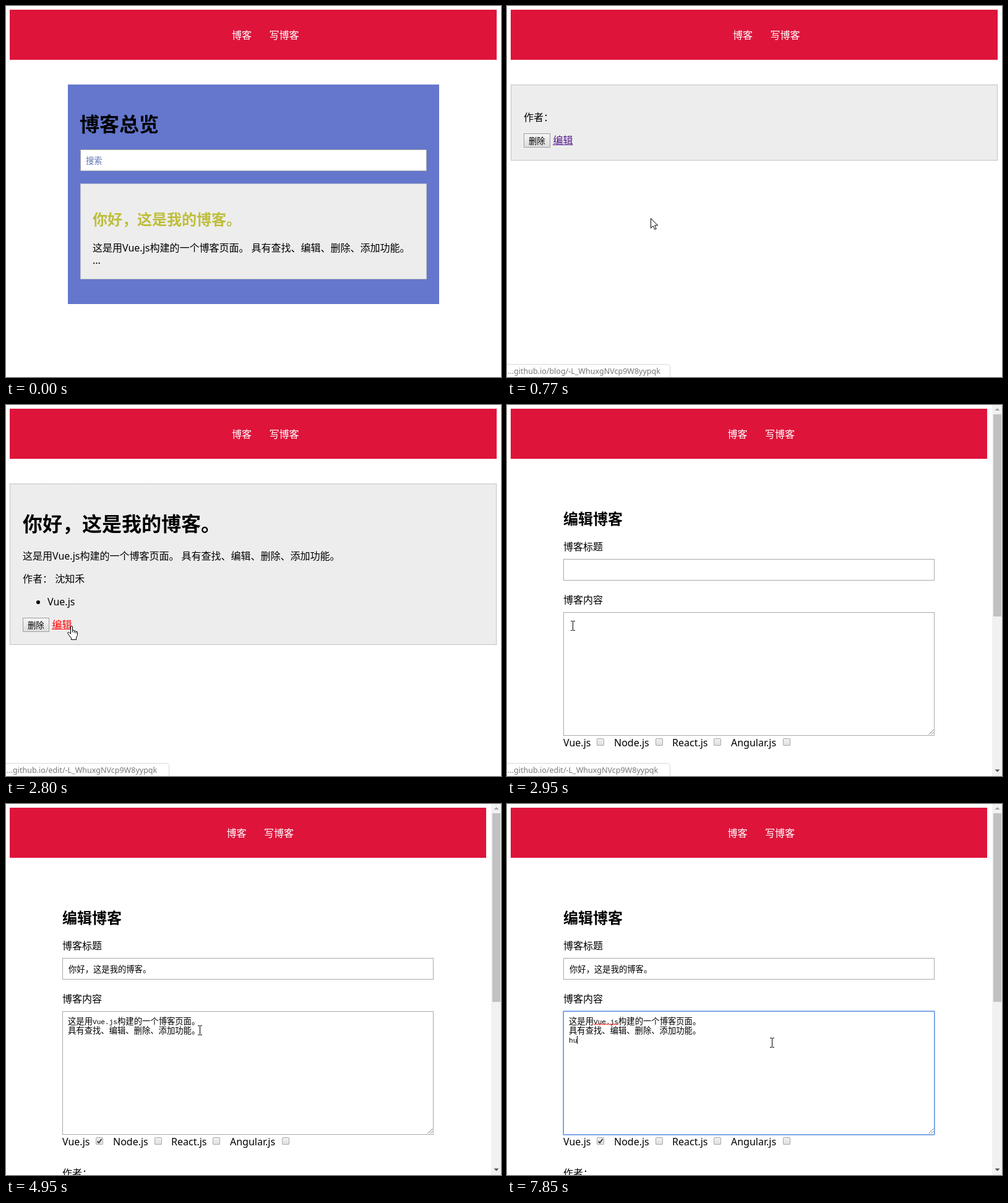
Animation of 800x600 px, one loop 8000 ms. Source, as an HTML page with a canvas:

```html
<!DOCTYPE html>
<html lang="zh-CN">
<head>
<meta charset="utf-8">
<title>博客</title>
<style>
html, body { margin: 0; width: 100%; height: 100%; overflow: hidden; background: #fff; }
canvas { display: block; }
</style>
</head>
<body>
<canvas id="stage" width="800" height="600"></canvas>
<script>
const ctx = document.getElementById('stage').getContext('2d', { alpha: false });
const LOOP = 8000;
const SANS = '"Noto Sans", "Noto Sans CJK SC", "Noto Sans CJK", sans-serif';
const MONO = '"Liberation Mono", monospace';
const SMALL = 13.333;

const TITLE = '你好，这是我的博客。';
const INTRO = '这是用Vue.js构建的一个博客页面。 具有查找、编辑、删除、添加功能。';
const AUTHOR = '沈知禾';
const POST_ID = '-L_WhuxgNVcp9W8yypqk';

const ARROW = new Path2D('M.5 .5V16.2L4.2 12.7 6.8 18.4 9.2 17.4 6.7 11.8H11.6Z');
const HAND = new Path2D('M5.5 13V2Q5.5 .5 7 .5T8.5 2V7.5Q10.8 6.3 11.3 8.4 13.2 7.3 14 9.3 16.5 8.7 16.5 11V15.5L14.5 19V22.5H6.5V20L3.2 15.8 .8 12.3Q.5 10.3 2.5 10.4Z');

// Drawing helpers
function rect(x, y, w, h, color) {
  ctx.fillStyle = color;
  ctx.fillRect(x, y, w, h);
}

function frame(x, y, w, h, color) {
  ctx.strokeStyle = color;
  ctx.lineWidth = 1;
  ctx.strokeRect(x + .5, y + .5, w - 1, h - 1);
}

function text(str, x, y, size = 16, color = '#000', weight = 400, family = SANS) {
  ctx.font = `${weight} ${size}px ${family}`;
  ctx.fillStyle = color;
  ctx.fillText(str, x, y);
}

function field(x, y, w, h) {
  rect(x, y, w, h, '#fff');
  frame(x, y, w, h, '#a9a9a9');
}

function card(x, y, w, h) {
  rect(x, y, w, h, '#ededed');
  ctx.setLineDash([1, 1]);
  frame(x, y, w, h, '#999');
  ctx.setLineDash([]);
}

function shade(y, h, from, to) {
  const g = ctx.createLinearGradient(0, y, 0, y + h);
  g.addColorStop(0, from);
  g.addColorStop(1, to);
  return g;
}

function triangle(x, y, dir, color) {
  ctx.fillStyle = color;
  ctx.beginPath();
  ctx.moveTo(x - 4, y);
  ctx.lineTo(x + 4, y);
  ctx.lineTo(x, y + 4 * dir);
  ctx.fill();
}

// Timing helpers: progress advances in n discrete steps from t0 to t1
function steps(t, t0, t1, n) {
  if (t < t0) return 0;
  return Math.min(n, Math.floor((t - t0) / (t1 - t0) * (n - 1) + .1) + 1) / n;
}

function along(pts, k) {
  const p = k * (pts.length - 1);
  const i = Math.min(Math.floor(p), pts.length - 2);
  const [a, b] = [pts[i], pts[i + 1]];
  return [0, 1].map(j => Math.round(a[j] + (b[j] - a[j]) * (p - i)));
}

// Page parts
function header(right, shift) {
  rect(6, 6, right - 6, 81, '#de143b');
  text('博客', 365 - shift, 53, 16, '#fff');
  text('写博客', 425.5 - shift, 53, 16, '#fff');
}

function listPage() {
  header(793, 0);
  rect(100, 127, 600, 355, '#6477cd');
  text('博客总览', 119, 203, 32, '#000', 700);
  field(120, 232, 560, 35);
  text('搜索', 129, 254.5, SMALL, '#5b70b3');
  card(120, 287, 560, 155);
  text(TITLE, 140, 354, 24, '#bebe3c', 700);
  text(INTRO, 140, 396.5);
  text('...', 140, 417);
}

function actions(y, active) {
  rect(27, y, 43, 23, shade(y, 23, '#f7f7f7', '#dcdcdc'));
  frame(27, y, 43, 23, '#a0a0a0');
  text('删除', 35, y + 16.5, SMALL);
  const color = active ? '#f00' : '#551a8b';
  text('编辑', 74.5, y + 17, 16, color);
  rect(74, y + 18, 32.5, 1, color);
}

function postPage(loaded, active) {
  header(793, 0);
  card(6, 127, 787, loaded ? 261 : 123);
  if (!loaded) {
    text('作者：', 27, 186);
    actions(206, false);
    return;
  }
  text(TITLE, 27, 204, 32, '#000', 700);
  text(INTRO, 27, 250);
  text('作者： ' + AUTHOR, 27, 287);
  ctx.beginPath();
  ctx.arc(52, 319, 3, 0, 7);
  ctx.fill();
  text('Vue.js', 67, 324);
  actions(344, active);
}

function checkbox(x, checked) {
  rect(x, 539, 12, 12, shade(539, 12, '#f2f2f2', '#dedede'));
  ctx.strokeStyle = '#aaa';
  ctx.beginPath();
  ctx.roundRect(x + .5, 539.5, 11, 11, 1.5);
  ctx.stroke();
  if (!checked) return;
  ctx.strokeStyle = '#404040';
  ctx.lineWidth = 2;
  ctx.beginPath();
  ctx.moveTo(x + 2.7, 545.5);
  ctx.lineTo(x + 5, 548);
  ctx.lineTo(x + 9.5, 541.8);
  ctx.stroke();
  ctx.lineWidth = 1;
}

function scrollbar(end) {
  rect(784, 0, 16, 600, '#f1f1f1');
  rect(786, 15, 13, end - 15, '#c1c1c1');
  triangle(792.5, 9, -1, '#a3a3a3');
  triangle(792.5, 589.5, 1, '#505050');
}

function focusRing() {
  ctx.strokeStyle = '#9cbcf0';
  ctx.beginPath();
  ctx.roundRect(90.5, 334.5, 601, 201, 1);
  ctx.stroke();
  frame(91, 335, 600, 200, '#5e92e4');
}

function squiggle() {
  ctx.strokeStyle = '#f00';
  ctx.beginPath();
  for (let x = 140; x <= 180; x += 2) ctx.lineTo(x, x % 4 ? 357 : 355.5);
  ctx.stroke();
}

function editor(t) {
  const half = SMALL / 2;
  text('这是用', 100, 356, SMALL, '#000', 300);
  text('Vue.js', 140, 355.5, 11.11, '#000', 400, MONO);
  text('构建的一个博客页面。', 180, 356, SMALL, '#000', 300);
  text('具有查找、编辑、删除、添加功能。', 100, 371, SMALL, '#000', 300);
  if (t < 5440) return;
  focusRing();
  squiggle();
  if (t < 5820) rect(313, 360, 1, 13, '#000');
  if (t >= 7150) {
    const n = t < 7300 ? 1 : t < 7450 || t >= 7850 ? 2 : 3;
    text('hui'.slice(0, n), 100, 386, 11.11, '#000', 400, MONO);
    rect(Math.round(100 + n * half), 375, 1, 13, '#000');
  }
}

function editPage(t) {
  const loaded = t >= 3180;
  header(776, 8.5);
  text('编辑博客', 91, 193, 24, '#000', 700);
  text('博客标题', 91, 235);
  field(91, 249, 600, 35);
  text('博客内容', 91, 321);
  field(91, 335, 600, 200);
  ctx.strokeStyle = '#777';
  ctx.beginPath();
  for (const d of [8, 4]) {
    ctx.moveTo(689.5 - d, 533);
    ctx.lineTo(689.5, 533 - d);
  }
  ctx.stroke();
  const tags = [['Vue.js', 91, 145], ['Node.js', 173, 240], ['React.js', 267, 334], ['Angular.js', 362, 446]];
  tags.forEach(([name, x, box], i) => {
    text(name, x, 552);
    checkbox(box, loaded && i === 0);
  });
  if (loaded) {
    text(TITLE, 101, 272, SMALL);
    editor(t);
    text('作者：', 91, 603);
  }
  scrollbar(loaded ? 320 : 342);
}

function status(route, alpha) {
  if (alpha <= 0) return;
  ctx.globalAlpha = alpha;
  ctx.fillStyle = '#fff';
  ctx.strokeStyle = '#d8d8d8';
  ctx.beginPath();
  ctx.roundRect(-5.5, 579.5, 269, 30, 4);
  ctx.fill();
  ctx.stroke();
  text(`...github.io/${route}/${POST_ID}`, 1, 595, 12.5, '#777');
  ctx.globalAlpha = 1;
}

// Pointers
function pointer(shape, x, y) {
  ctx.save();
  ctx.translate(x, y);
  ctx.fillStyle = '#fff';
  ctx.strokeStyle = '#000';
  ctx.lineWidth = 1;
  ctx.fill(shape);
  ctx.stroke(shape);
  if (shape === HAND) {
    ctx.beginPath();
    for (const [kx, ky] of [[8.5, 7.5], [11.3, 8.5], [14, 9.5]]) {
      ctx.moveTo(kx, ky);
      ctx.lineTo(kx, ky + 3);
    }
    ctx.stroke();
  }
  ctx.restore();
}

function ibeam(x, y) {
  rect(x, y + 1, 1, 14, '#000');
  for (const row of [y, y + 15]) {
    rect(x - 3, row, 3, 1, '#000');
    rect(x + 1, row, 3, 1, '#000');
  }
}

function cursor(t) {
  if (t < 70) return;
  if (t < 1410) {
    const [x, y] = along([[400, 580], [290, 420], [232, 343]], steps(t, 70, 460, 6));
    if (t >= 460 && t < 770) pointer(HAND, x - 6, y);
    else pointer(ARROW, x, y);
  } else if (t < 2950) {
    const [x, y] = along([[232, 343], [137, 340], [105, 357]], steps(t, 1410, 1800, 6));
    if (t >= 1800) pointer(HAND, x - 6, y);
    else pointer(ARROW, x, y);
  } else if (t < 4800) {
    ibeam(...along([[106, 349], [282, 356]], steps(t, 3950, 4720, 11)));
  } else if (t < 5820) {
    ibeam(...along([[282, 356], [313, 358], [317, 359]], steps(t, 4800, 5190, 6)));
  } else {
    ibeam(...along([[317, 359], [428, 378]], steps(t, 5820, 6050, 4)));
  }
}

function draw(t) {
  rect(0, 0, 800, 600, '#fff');
  ctx.lineWidth = 1;
  if (t < 770) listPage();
  else if (t < 2950) postPage(t >= 1010, t >= 2800);
  else editPage(t);
  if (t >= 540 && t < 1240) status('blog', 1 - steps(t, 1010, 1240, 4));
  if (t >= 1940) status('edit', 1 - steps(t, 3180, 3420, 4));
  cursor(t);
}

function tick() {
  draw(performance.now() % LOOP);
  requestAnimationFrame(tick);
}
tick();
</script>
</body>
</html>
```
